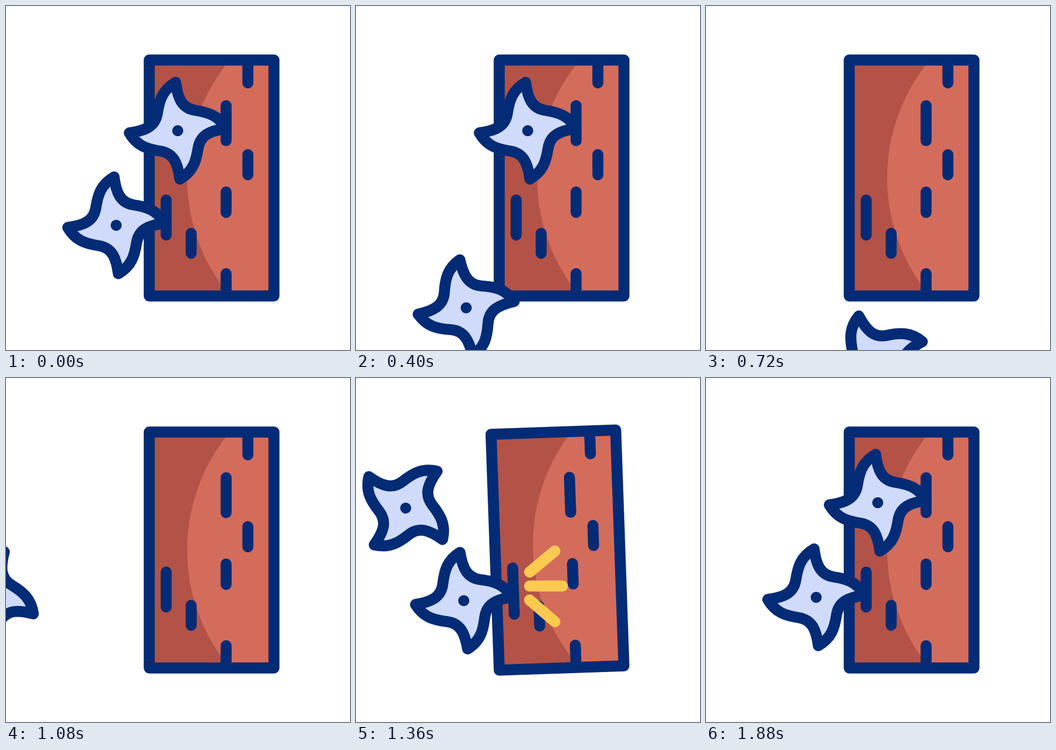
Animation, 640 px wide and 640 px high, one loop 2000 ms. Source, as an HTML page:

```html
<!DOCTYPE html>
<html lang="en">
<head>
<meta charset="utf-8">
<title>Throwing stars</title>
<style>
  html, body { margin: 0; width: 100%; height: 100%; overflow: hidden; background: #fff; }
  svg { display: block; width: 100%; height: 100%; }
  .line { fill: none; stroke: #042b76; stroke-width: 20.5; stroke-linecap: round; stroke-linejoin: round; }
  .steel { fill: #d0dbfb; }
  .ray { stroke: #fcca50; }
</style>
</head>
<body>
<svg viewBox="0 0 640 640">
  <defs>
    <g id="star">
      <path id="blade" class="line steel"/>
      <circle r="10.3" fill="#042b76"/>
    </g>
  </defs>
  <g id="board">
    <path fill="#b35347" d="M266.5 100.5h232v439h-232z"/>
    <path fill="#d46c5c" d="M408 111A343 343 0 0 0 408 529H498V111z"/>
    <path class="line" d="M266.5 100.5h232v439h-232zM450 101v42M450 276.500v37.500M409.500 346v38M344.500 423v37M409.500 498v41"/>
    <path class="line" id="cutHigh"/>
    <path class="line" id="cutLow"/>
    <use href="#star" id="starLow"/>
    <use href="#star" id="starHigh"/>
  </g>
  <g id="rays"></g>
</svg>
<script>
const LOOP = 2000, STEP = 40, START_X = -113.5;
const $ = id => document.getElementById(id);

// One edge of the blade, turned four times about the centre.
const edge = [[0, -60], [8, -42], [32, -38], [58, -34], [76, -28], [90, -4]];
const turn = ([x, y], n) => n ? turn([-y, x], n - 1) : [x, y];
$('blade').setAttribute('d', 'M-4 -90' +
  [0, 1, 2, 3].map(n => 'C' + edge.map(p => turn(p, n).join(' ')).join(' ')).join('') + 'z');

// Linear interpolation through [time, value] keys.
function track(keys, t) {
  if (t <= keys[0][0]) return keys[0][1];
  for (let i = 1; i < keys.length; i++) {
    const [t0, v0] = keys[i - 1], [t1, v1] = keys[i];
    if (t < t1) return v0 + (v1 - v0) * (t - t0) / (t1 - t0);
  }
  return keys[keys.length - 1][1];
}

const sway = [[1200, 0], [1280, 2], [1360, -2], [1440, 2], [1520, -2], [1600, 0]];
const stars = [
  { el: $('starLow'), x: 205, y: 408, drop: 200, hit: 1200, cut: $('cutLow'), cx: 298, cy: 393.5 },
  { el: $('starHigh'), x: 319.5, y: 232, drop: 400, hit: 1440, cut: $('cutHigh'), cx: 409.5, cy: 218 }
];

const rays = [];
for (const [x, y, delay] of [[323, 387, 0], [427.5, 216, 200]]) {
  for (const [dy, ex, ey, lag] of [[0, 61, 0, 0], [-26, 47, -39, 35], [26, 47, 40.5, 35]]) {
    const el = document.createElementNS('http://www.w3.org/2000/svg', 'path');
    el.setAttribute('class', 'line ray');
    $('rays').append(el);
    rays.push({ el, x, y: y + dy, ex, ey, from: 1170 + delay + lag });
  }
}

function drawStar(s, t) {
  let { x, y } = s, spin = 0;
  if (t < 1000) {
    const fall = Math.max(0, t - s.drop);
    y += 153.5 * (fall / 200) ** 2.18;
    spin = -5 * (fall / 200) ** 3;
  } else {
    const p = track([[s.hit - 160, 0], [s.hit, 1]], t);
    x = START_X + (s.x - START_X) * p;
    spin = 90 * (p - 1);
  }
  s.el.setAttribute('transform', `translate(${x} ${y}) rotate(${spin})`);
  const half = track([[s.hit, 32.5], [s.hit + 160, 43], [s.hit + 320, 32.5]], t);
  s.cut.setAttribute('d', `M${s.cx} ${s.cy - half}v${2 * half}`);
}

function drawRay(r, t) {
  const head = track([[r.from, 0], [r.from + 115, 1]], t);
  const tail = track([[r.from + 225, 0], [r.from + 345, 1]], t);
  r.el.setAttribute('visibility', head > tail ? 'visible' : 'hidden');
  r.el.setAttribute('d', `M${r.x + r.ex * tail} ${r.y + r.ey * tail}L${r.x + r.ex * head} ${r.y + r.ey * head}`);
}

function draw(now) {
  const t = Math.floor((now % LOOP) / STEP) * STEP;
  $('board').setAttribute('transform', `rotate(${track(sway, t)} 382.5 540)`);
  stars.forEach(s => drawStar(s, t));
  rays.forEach(r => drawRay(r, t));
}

const begin = performance.now();
function tick() {
  draw(performance.now() - begin);
  requestAnimationFrame(tick);
}
tick();
</script>
</body>
</html>
```
